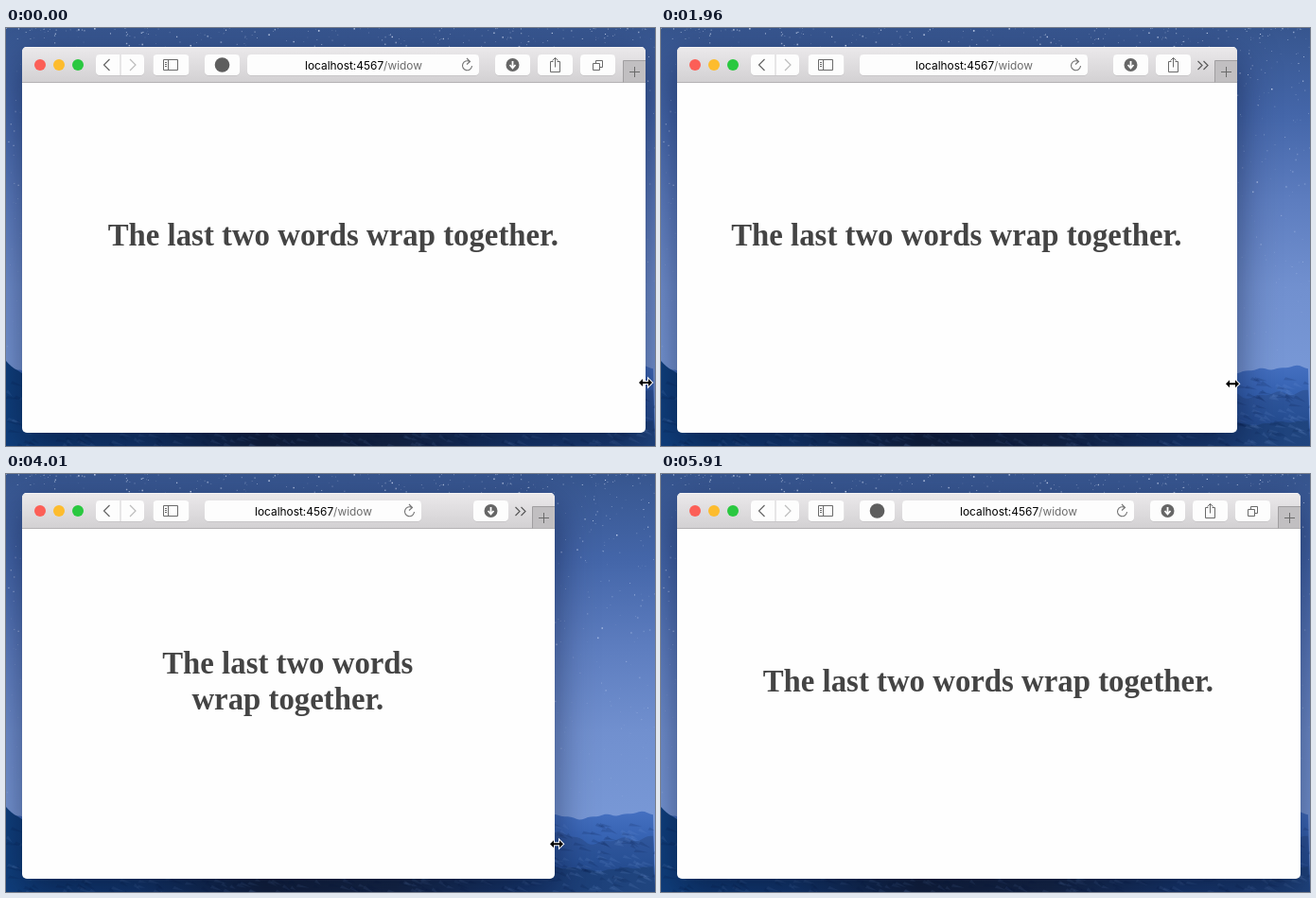
Animation, 686 px wide and 442 px high, one loop 6.38 s. Source, as an HTML page with a canvas:

```html
<!DOCTYPE html>
<html lang="en">
<head>
<meta charset="utf-8">
<title>Widow control</title>
<style>
html, body { margin: 0; width: 686px; height: 442px; overflow: hidden; }
canvas { display: block; }
</style>
</head>
<body>
<canvas id="stage" width="686" height="442"></canvas>
<script>
const W = 686, H = 442, LOOP = 6380, TICK = 60;
const LEFT = 17, TOP = 20, BOTTOM = 428, WIDE = 676, NARROW = 548;
const g = document.getElementById('stage').getContext('2d');

const progress = (t, from, to) => Math.min(1, Math.max(0, (t - from) / (to - from)));
const shrink = t => progress(t, 1340, 2360) ** 1.23;
const grow = t => {
  const p = progress(t, 3540, 4966);
  return p * p * (3 - 2 * p);
};
const dragX = (t, shrinkLag = 0, growLag = 0) =>
  WIDE - (WIDE - NARROW) * (shrink(t - shrinkLag) - grow(t - growLag));

// The window edge trails the pointer that drags it.
function poseAt(time) {
  const t = Math.floor((time + 20) / TICK) * TICK;
  const dip = time >= 5850 ? 12 : 0;
  return {
    right: Math.round(dragX(t, 40, 15)),
    x: Math.round(dragX(t)),
    y: 375 + 13.5 * shrink(t) ** 4 + 3.6 * Math.sin(Math.PI * grow(t)) + dip,
    visible: time < 5910
  };
}

function gradient(c, x0, y0, x1, y1, colors) {
  const fill = c.createLinearGradient(x0, y0, x1, y1);
  colors.forEach((color, i) => fill.addColorStop(i / (colors.length - 1), color));
  return fill;
}

function fillBelow(c, ridge, fill) {
  c.beginPath();
  c.moveTo(0, H);
  for (let x = 0; x <= W; x += 3) c.lineTo(x, ridge(x));
  c.lineTo(W, H);
  c.fillStyle = fill;
  c.fill();
}

function makeWallpaper() {
  const canvas = document.createElement('canvas');
  canvas.width = W;
  canvas.height = H;
  const c = canvas.getContext('2d');
  let seed = 11;
  const rand = () => (seed = seed * 16807 % 2147483647) / 2147483647;

  c.fillStyle = gradient(c, 0, 0, 0, 365, ['#37568f', '#4466a9', '#5d7dbf', '#7190cf', '#7898d6']);
  c.fillRect(0, 0, W, H);
  for (let i = 0; i < 1300; i++) {
    const y = rand() ** 1.6 * 345, size = 0.6 + rand() ** 3 * 1.1;
    c.fillStyle = `rgba(222,233,255,${(0.25 + rand() * 0.7) * (1 - y / 420)})`;
    c.fillRect(rand() * W, y, size, size);
  }

  const rough = x => Math.sin(x / 19) + 0.5 * Math.sin(x / 7) + 0.3 * Math.sin(x / 3);
  fillBelow(c, x => 361 + 2.5 * rough(x + 20), gradient(c, 0, 358, 0, H, ['#446fc0', '#2f5cab', '#1f4688']));
  fillBelow(c, x => 384 + 5 * rough(x * 0.8), gradient(c, 0, 375, 0, H, ['#33599f', '#285095', '#1d4080']));
  fillBelow(c, x => 417 - 65 * Math.exp(-x / 90) + 2 * rough(x),
    gradient(c, 0, 0, W, 0, ['#10407e', '#153c74', '#14233f', '#182a4a', '#1a3c74', '#20457f']));
  // Rock facets
  for (let i = 0; i < 700; i++) {
    const x = rand() * W, y = 368 + rand() * 74;
    c.fillStyle = rand() < 0.5 ? 'rgba(120,160,225,.13)' : 'rgba(8,24,66,.16)';
    c.beginPath();
    c.moveTo(x, y);
    c.lineTo(x + 4 + rand() * 9, y + 3 + rand() * 5);
    c.lineTo(x - 2, y + 3);
    c.fill();
  }
  return canvas;
}

const wallpaper = makeWallpaper();

function box(x, y, w, h, r) {
  g.beginPath();
  g.roundRect(x, y, w, h, r);
}

function disc(x, y, r, color) {
  g.beginPath();
  g.arc(x, y, r, 0, 7);
  g.fillStyle = color;
  g.fill();
}

function stroke(path, x, y, color = '#6a6a6a', width = 1) {
  g.save();
  g.translate(x, y);
  g.strokeStyle = color;
  g.lineWidth = width;
  g.stroke(new Path2D(path));
  g.restore();
}

function button(x, w) {
  box(x, 28.5, w, 22, 4);
  g.fillStyle = '#b9b7b9';
  g.fill();
  box(x, 28, w, 22, 4);
  g.fillStyle = '#fdfdfd';
  g.fill();
}

const icons = [
  x => {
    disc(x, 39, 7, '#666');
    stroke('M0 -4V2M-3 0L0 3.3L3 0', x, 39, '#fff', 1.8);
  },
  x => stroke('M-2 -3H-5V8H5V-3H2M0 3V-7M-3 -4L0 -7L3 -4', x, 38.5),
  x => stroke('M-5 -2H2V5H-5ZM-2 -2V-5H5V2H2', x, 39.5)
];

function drawUrl(x, w) {
  button(x, w);
  g.font = '11.9px Inter, sans-serif';
  g.textAlign = 'left';
  const host = 'localhost:4567', path = '/widow';
  const hostWidth = g.measureText(host).width;
  const start = x + (w - hostWidth - g.measureText(path).width) / 2 + 0.5;
  g.fillStyle = '#000';
  g.fillText(host, start, 44);
  g.fillStyle = '#6c6c6c';
  g.fillText(path, start + hostWidth, 44);
  stroke('M2.5 -4.1A5 5 0 1 0 5 0.5M-0.5 -7.5L3 -4L-0.5 -1', x + w - 12.5, 39.5, '#757575', 1.1);
}

function drawToolbar(right) {
  g.fillStyle = gradient(g, 0, TOP, 0, 57, ['#ebe9eb', '#dfdddf', '#d3d1d3']);
  g.fillRect(LEFT, TOP, right - LEFT, 37);
  g.fillStyle = '#f5f4f5';
  g.fillRect(LEFT, TOP, right - LEFT, 1);
  g.fillStyle = '#b3b1b3';
  g.fillRect(LEFT, 57, right - LEFT, 1);
  ['#fc5f57', '#fdbc2e', '#2ac840'].forEach((color, i) => disc(36 + 20 * i, 39, 6, color));

  button(95, 51);
  g.fillStyle = '#d2d0d2';
  g.fillRect(120.5, 28, 1, 22);
  stroke('M3 -6L-3 0L3 6', 106.5, 39, '#666', 1.2);
  stroke('M-3 -6L3 0L-3 6', 134, 39, '#bcbcbc', 1.2);
  button(155.5, 38);
  stroke('M-7.5 -5.5H7.5V5.5H-7.5ZM-2.5 -5.5V5.5M-6 -2.5H-4M-6 -0.5H-4M-6 1.5H-4', 174, 39);

  // Buttons that no longer fit collapse behind a chevron.
  const full = right >= 656;
  const count = right >= 627 ? 3 : right >= 582 ? 2 : 1;
  const first = right - (full ? 32 : 49) - 37 - 45 * (count - 1);
  const urlX = full ? 255 : 210;
  if (full) {
    button(210, 37);
    disc(228.5, 39, 7.8, '#5e5e5e');
  }
  drawUrl(urlX, Math.min(Math.max(225, Math.round(right * 0.395)), first - 17 - urlX));
  for (let i = 0; i < count; i++) {
    button(first + 45 * i, 37);
    icons[i](first + 45 * i + 18.5);
  }
  if (!full) stroke('M-5.5 -4.5L-1 0L-5.5 4.5M0.5 -4.5L5 0L0.5 4.5', right - 36, 39.5, '#5a5a5a', 1.2);

  g.fillStyle = '#c1bfc1';
  g.fillRect(right - 23, 34, 23, 23);
  stroke('M0 23V0H24', right - 23.5, 34.5, '#a09ea0');
  stroke('M-5.5 0H5.5M0 -5.5V5.5', right - 11.5, 46.5);
}

function drawHeading(right) {
  const center = (LEFT + right) / 2 - 0.7;
  const lines = right < 588 ? ['The last two words', 'wrap together.'] : ['The last two words wrap together.'];
  g.font = 'bold 32.8px "Liberation Serif", serif';
  g.textAlign = 'center';
  g.fillStyle = '#444';
  lines.forEach((line, i) => g.fillText(line, center, 230 + 38 * (i - (lines.length - 1) / 2)));
}

function drawWindow(right) {
  g.save();
  g.shadowColor = 'rgba(0,10,40,.5)';
  g.shadowBlur = 42;
  g.shadowOffsetY = 14;
  box(LEFT, TOP, right - LEFT, BOTTOM - TOP, 5);
  g.fillStyle = '#fefefe';
  g.fill();
  g.restore();
  g.save();
  g.clip();
  drawToolbar(right);
  drawHeading(right);
  g.restore();
}

const pointer = new Path2D('M-7 0L-3 -4V-1H3V-4L7 0L3 4V1H-3V4Z');

function drawPointer(x, y) {
  g.save();
  g.translate(x, y);
  g.strokeStyle = '#fff';
  g.lineWidth = 2;
  g.stroke(pointer);
  g.fillStyle = '#000';
  g.fill(pointer);
  g.restore();
}

function draw(now) {
  const { right, x, y, visible } = poseAt(now % LOOP);
  g.drawImage(wallpaper, 0, 0);
  drawWindow(right);
  if (visible) drawPointer(x, y);
}

let start;
function tick(now) {
  start ??= now;
  draw(now - start);
  requestAnimationFrame(tick);
}
draw(0);
requestAnimationFrame(tick);
</script>
</body>
</html>
```
